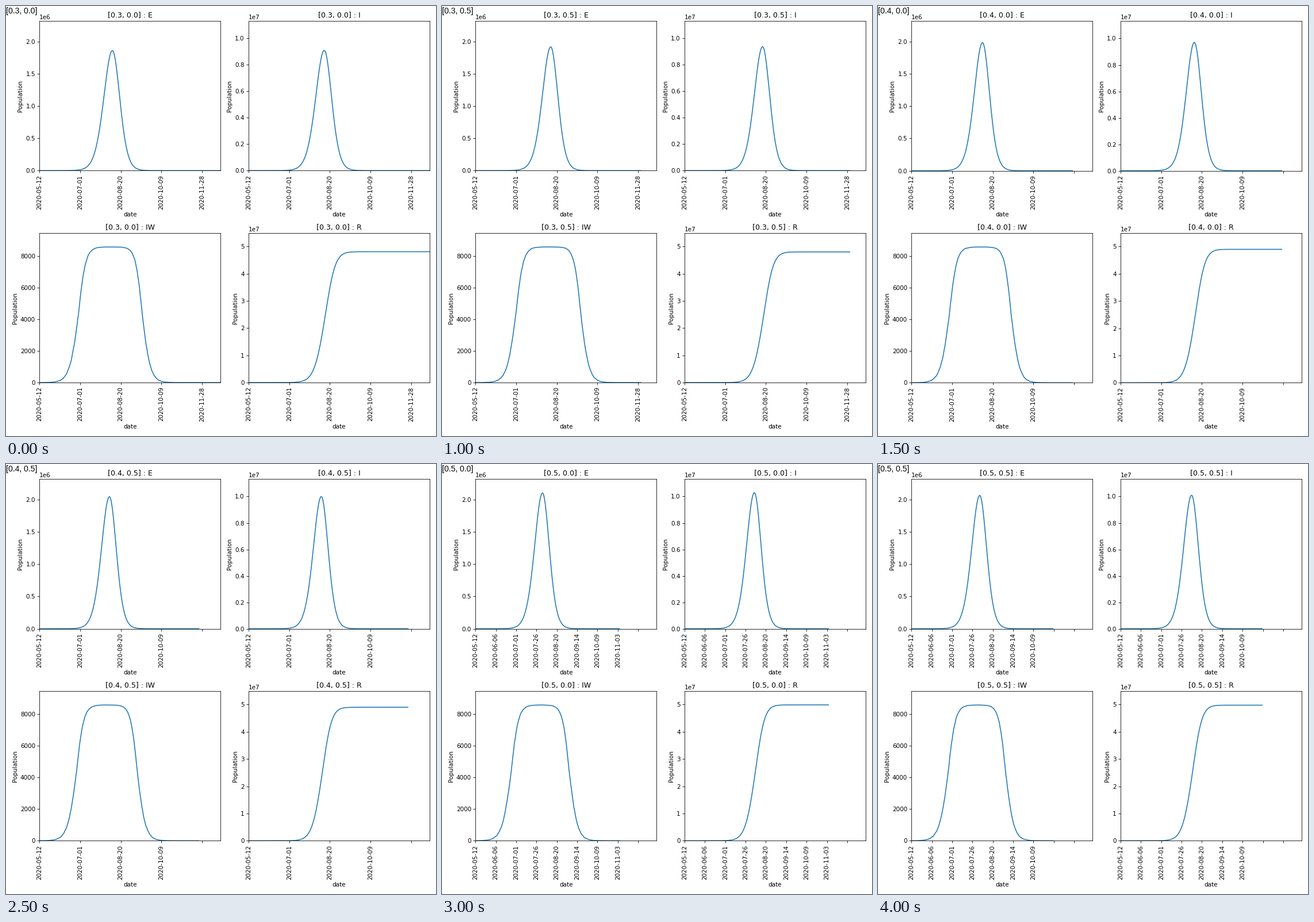
Animation, 748 px wide and 748 px high, one loop 4.5 s. Source, as a matplotlib script:

```python
import numpy as np
import matplotlib.pyplot as plt
from matplotlib.animation import FuncAnimation

SIZE = 748
DPI = 74.8
START = np.datetime64("2020-05-12")
SPAN = 222.5            # days shown on the date axis
WARD_MAX = 8590         # number of infected wards at saturation
RECOVERY = 0.206        # recoveries per infected person and day
I_PER_E = 4.88

# parameters, E peak day, E peak (1e6), final R (1e7), IW half-rise, IW half-fall, last day
RUNS = [
    ("[0.3, 0.0]", 89.65, 1.865, 4.807, 47.8, 126.4, 222.5),
    ("[0.3, 0.25]", 91.1, 1.895, 4.805, 48.7, 128.0, 213),
    ("[0.3, 0.5]", 92.5, 1.923, 4.800, 49.6, 129.6, 203),
    ("[0.4, 0.0]", 87.3, 1.990, 4.895, 46.5, 122.6, 198),
    ("[0.4, 0.25]", 88.1, 2.010, 4.900, 47.3, 122.9, 209),
    ("[0.4, 0.5]", 86.0, 2.050, 4.898, 45.4, 120.4, 196),
    ("[0.5, 0.0]", 82.4, 2.109, 4.985, 43.7, 115.4, 177),
    ("[0.5, 0.25]", 83.3, 2.090, 4.980, 44.4, 115.7, 180),
    ("[0.5, 0.5]", 83.9, 2.070, 4.975, 45.0, 115.8, 174),
]

# name, column, row, top of the value axis
PANELS = [("E", 0, 0, 2.321e6), ("I", 1, 0, 1.131e7),
          ("IW", 0, 1, 9465), ("R", 1, 1, 5.49e7)]

LEFTS = (58.3, 422.05)
WIDTH = 314.7
TOP = 26.35

fig = plt.figure(figsize=(SIZE / DPI, SIZE / DPI), dpi=DPI, facecolor="white")
axes = [fig.add_subplot(2, 2, k + 1) for k in range(4)]
stamp = fig.text(0, 1 - 13 / SIZE, "", family="Liberation Sans",
                 fontsize=14 * 72 / DPI, va="baseline", ha="left", zorder=10)


def bump(t, peak, scale):
    """Epidemic wave of height 1, rising slower than it falls."""
    u = t - peak
    return np.cosh(u / (scale * np.where(u < 0, 1.08, 0.92))) ** -4


def saturate(u):
    """Logistic step with a longer foot than shoulder, 0.5 at u = 0."""
    return 1 / (1 + np.exp(-u / np.where(u < 0, 1.1, 0.9)))


def wards(t, rise, fall, seed):
    share = saturate((t - rise) / 5.0) * saturate((fall - t) / 4.6)
    noise = np.random.default_rng(seed).normal(0, 45, t.size)
    return WARD_MAX * share + noise * np.sqrt(share * (1 - share))


def curves(k):
    _, peak, e_top, r_end, rise, fall, last = RUNS[k]
    t = np.append(np.arange(np.ceil(last)), last)
    e_top, r_end = e_top * 1e6, r_end * 1e7
    i_top = I_PER_E * e_top
    # the area under the wave is 4/3 of its scale
    scale = 0.75 * r_end / (RECOVERY * i_top)
    removed = np.cumsum(bump(t, peak + 5.8, scale))
    return t, {
        "E": e_top * bump(t, peak, scale),
        "I": i_top * bump(t, peak + 3.4, scale),
        "IW": wards(t, rise, fall, 20 + k),
        "R": r_end * removed / removed[-1],
    }


def place(ax, col, row, full):
    """The rows grow slightly when the last date label is missing."""
    height, floor = (259.9, 655.0) if full else (260.2, 655.3)
    bottom = floor if row else TOP + height
    ax.set_position([LEFTS[col] / SIZE, 1 - bottom / SIZE,
                     WIDTH / SIZE, height / SIZE])


def draw(k):
    name, last = RUNS[k][0], RUNS[k][-1]
    t, data = curves(k)
    ticks = np.arange(0, SPAN, 25 if last < 185 else 50).astype(int)
    labels = [str(START + int(d)) if d < last else "" for d in ticks]
    for ax, (kind, col, row, top) in zip(axes, PANELS):
        ax.clear()
        ax.plot(t, data[kind], color="#1f77b4", lw=1.5)
        ax.set_xlim(0, SPAN)
        ax.set_ylim(0, top)
        ax.set_xticks(ticks, labels, rotation=90)
        ax.set_xlabel("date")
        ax.set_ylabel("Population")
        ax.set_title(f"{name} : {kind}")
        place(ax, col, row, last > 200)
    stamp.set_text(name)
    return axes


anim = FuncAnimation(fig, draw, frames=len(RUNS), interval=500,
                     init_func=lambda: draw(0), repeat=True,
                     repeat_delay=0, blit=False)
plt.show()
```
